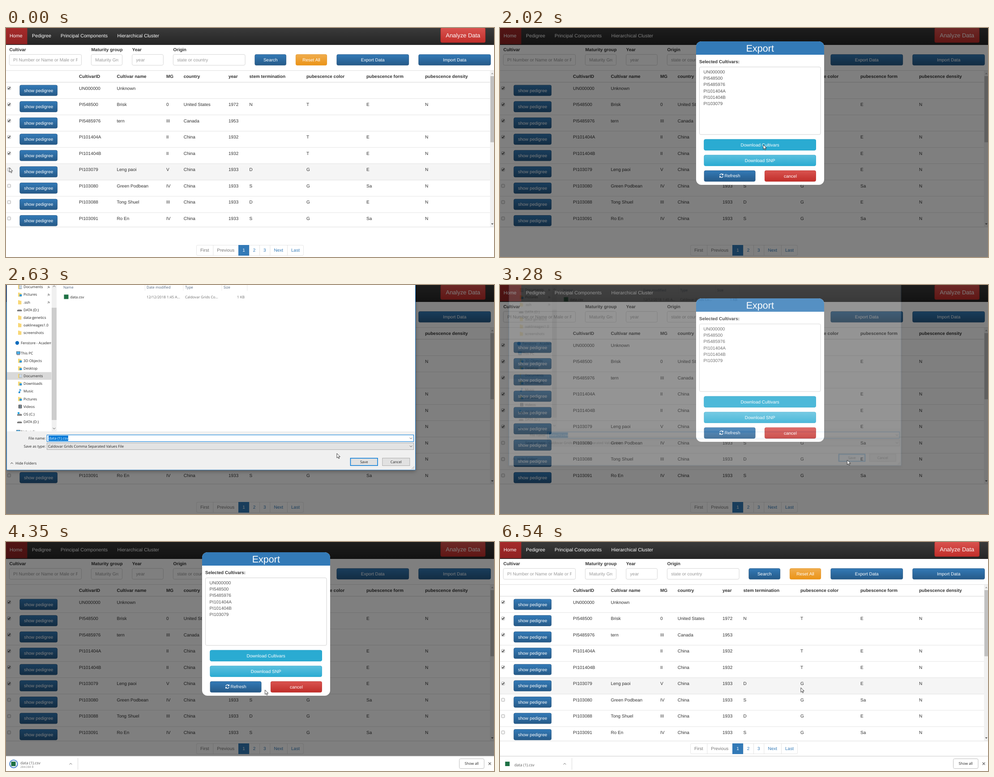
Animation of 1090 by 514 pixels, one loop 6.84 s. Source, as an HTML page:

```html
<!DOCTYPE html>
<html lang="en">
<head>
<meta charset="utf-8">
<title>Export data</title>
<style>
  html, body { margin: 0; width: 100%; height: 100%; overflow: hidden; background: #fff; }
  #stage { display: block; width: 1090px; height: 514px; font-family: "Liberation Sans", Arial, sans-serif; text-rendering: geometricPrecision; }
  text { white-space: pre; }
  .ui { font-family: "Open Sans", "Noto Sans", sans-serif; }
  #dialog { transform-origin: 457.5px 165px; filter: drop-shadow(0 3px 4px rgba(0,0,0,.3)); }
  #ring { transform-origin: 17px 498px; }
</style>
<style id="motion"></style>
</head>
<body>
<svg id="stage" viewBox="0 0 1090 514" xmlns="http://www.w3.org/2000/svg"></svg>
<script>
const LOOP = 6840, ROW = 36.55;
const themes = {
  primary: ['#337ab7', '#265a88', '#245580'],
  warning: ['#f0ad4e', '#eb9316', '#e38d13'],
  danger: ['#d9534f', '#c12e2a', '#b92c28'],
  info: ['#5bc0de', '#2aabd2', '#28a4c9'],
  nav: ['#3a3a3a', '#252525'],
  home: ['#a52a2a', '#8f2323']
};

const rect = (x, y, w, h, fill, more = '') =>
  `<rect x="${x}" y="${y}" width="${w}" height="${h}" fill="${fill}" ${more}/>`;
const box = (x, y, w, h, fill, stroke, r = 0, sw = 1) =>
  rect(x + sw / 2, y + sw / 2, w - sw, h - sw, fill, `rx="${r}" stroke="${stroke}" stroke-width="${sw}"`);
const path = (d, stroke, sw = 1, fill = 'none') =>
  `<path d="${d}" fill="${fill}" stroke="${stroke}" stroke-width="${sw}"/>`;
const text = (x, cy, s, { size = 10, fill = '#333', bold, anchor = 'start' } = {}) =>
  `<text x="${x}" y="${cy + size * .358}" font-size="${size}" fill="${fill}" text-anchor="${anchor}"${bold ? ' font-weight="700"' : ''}>${s}</text>`;
const group = (id, body, cls = '') => `<g id="${id}" class="${cls}">${body}</g>`;
const clip = (x, y, w, h, body) =>
  `<svg x="${x}" y="${y}" width="${w}" height="${h}" viewBox="${x} ${y} ${w} ${h}" overflow="hidden">${body}</svg>`;

function button(x, y, w, h, label, theme, { flat, size = 10.03 } = {}) {
  const [, low, edge] = themes[theme];
  return box(x, y, w, h, flat ? low : `url(#${theme})`, edge, 3, .8) +
    text(x + w / 2, y + h / 2, label, { size, fill: '#fff', anchor: 'middle' });
}

function field(x, w, label, hint) {
  return text(x + .5, 48, label, { bold: true }) + box(x, 59, w, 25, '#fff', '#ccc', 3, .8) +
    clip(x + 9, 60, w - 18, 23, text(x + 9.3, 71.5, hint, { fill: '#999' }));
}

function checkbox(cy, mark) {
  return box(2.8, cy - 4, 8, 8, '#f4f4f4', '#a4a4a4', 1.5, .9) + (mark || '');
}

// Page
const cols = [163, 247.5, 358, 396.7, 497, 543.5, 671, 805, 936];
const heads = 'CultivarID|Cultivar name|MG|country|year|stem termination|pubescence color|pubescence form|pubescence density';
const rows = [
  'UN000000|Unknown',
  'PI548500|Brisk|0|United States|1972|N|T|E|N',
  'PI5485976|tern|III|Canada|1953',
  'PI101404A||II|China|1932||T|E|N',
  'PI101404B||II|China|1932||T|E|N',
  'PI103079|Leng paoi|V|China|1933|D|G|E|N',
  'PI103080|Green Podbean|IV|China|1933|S|G|Sa|N',
  'PI103088|Tong Shuel|III|China|1933|D|G|E|N',
  'PI103091|Ro En|IV|China|1933|S|G|Sa|N'
];
const cells = (line, cy, bold) =>
  line.split('|').map((s, i) => text(cols[i], cy, s, { bold })).join('');

function tableRow(line, i) {
  const cy = 135 + i * ROW;
  const tick = path(`M4.6 ${cy}l1.7 1.9 3-4.2`, '#333', 1.5);
  const mark = i < 5 ? tick : i === 5 ? group('tick', tick) : '';
  return checkbox(cy, mark) + button(30.5, cy - 7.2, 84.5, 24.5, 'show pedigree', 'primary') +
    cells(line, cy) + rect(0, 121.5 + (i + 1) * ROW, 1081, .8, '#ddd');
}

function pager() {
  const edges = [425, 462.5, 519, 543, 566, 589.5, 628, 665];
  return box(425, 487, 240, 24, '#fff', '#ddd', 3, .8) +
    ['First', 'Previous', '1', '2', '3', 'Next', 'Last'].map((s, i) => {
      const x = edges[i], w = edges[i + 1] - x, on = i === 2;
      return (on ? rect(x, 487, w, 24, '#337ab7') : i ? rect(x, 487, .8, 24, '#ddd') : '') +
        text(x + w / 2, 498.7, s, { anchor: 'middle', fill: on ? '#fff' : i < 2 ? '#777' : '#337ab7' });
    }).join('');
}

const navItem = (x, s) => text(x, 17.5, s, { size: 10.74, fill: '#fff' });
const page =
  rect(0, 0, 1090, 514, '#fff') +
  rect(0, 0, 1090, 38, 'url(#nav)') + rect(0, 0, 47.5, 36.5, 'url(#home)') +
  navItem(8, 'Home') + navItem(58, 'Pedigree') + navItem(122, 'Principal Components') + navItem(248.5, 'Hierarchical Cluster') +
  button(970.5, -1, 100.5, 34, 'Analyze Data', 'danger', { size: 12.95 }) +
  field(7, 162, 'Cultivar', 'PI Number or Name or Male or Female') +
  field(190, 70, 'Maturity group', 'Maturity Group') +
  field(281.3, 70.5, 'Year', 'year') + field(373, 161.5, 'Origin', 'state or country') +
  button(555.5, 59, 70.5, 25, 'Search', 'primary') +
  button(647, 59, 70, 25, 'Reset All', 'warning') +
  button(738.5, 59, 161.5, 25, 'Export Data', 'primary') +
  group('exportHot', box(738.5, 59, 161.5, 25, 'inherit', '#1f6ab0', 3, 1.2) +
    text(819.2, 71.5, 'Export Data', { fill: '#fff', anchor: 'middle' })) +
  button(921.3, 59, 161.5, 25, 'Import Data', 'primary') +
  rect(0, 95, 1090, .9, '#ddd') + cells(heads, 108, true) + rect(0, 121, 1081, 1.3, '#ddd') +
  clip(0, 122, 1090, 324.5, group('hover', rect(0, 122, 1081, ROW, '#f5f5f5')) + rows.map(tableRow).join('')) +
  rect(0, 446.2, 1090, 1, '#ddd') +
  rect(1081, 96, 9, 350, '#f1f1f1') + rect(1082, 108, 8, 148.5, '#c1c1c1') +
  path('M1083.5 103.5l2.7-3 2.7 3z', 'none', 0, '#a3a3a3') + path('M1083.5 438.5l2.7 3 2.7-3z', 'none', 0, '#505050') +
  group('pager', pager()) +
  group('shade', rect(0, 0, 1090, 514, '#000'));

// Export panel
const ids = rows.slice(0, 6).map(r => r.split('|')[0]);
const refreshIcon =
  path('M490.8 330.4a3.9 3.9 0 0 1 6.6-1.7M498.2 332.6a3.9 3.9 0 0 1-6.6 1.7', '#fff', 1.5) +
  path('M498.9 326.6v3.8h-3.8zM490.1 336.4v-3.8h3.8z', 'none', 0, '#fff');
const refresh = flat => button(455.7, 319.7, 114.8, 25, '', 'primary', { flat }) + refreshIcon +
  text(501.5, 331.7, 'Refresh', { fill: '#fff' });
const modal =
  rect(438, 30, 286, 322, '#fff', 'rx="12"') +
  path('M438 60V42a12 12 0 0 1 12-12H712a12 12 0 0 1 12 12V60z', 'none', 0, '#337ab7') +
  text(580.8, 45, 'Export', { size: 21.5, fill: '#fff', anchor: 'middle' }) +
  text(445, 75.5, 'Selected Cultivars:', { bold: true }) +
  box(445, 87, 271.5, 152.5, '#fff', '#ccc', 3, .9) +
  ids.map((s, i) => text(454.5, 98.2 + i * 14.3, s, { fill: '#555' })).join('') +
  button(455.5, 249.7, 250.3, 25, 'Download Cultivars', 'info') +
  group('getHot', button(455.5, 249.7, 250.3, 25, 'Download Cultivars', 'info', { flat: true })) +
  button(455.5, 284.8, 250.3, 25, 'Download SNP', 'info') +
  refresh() + group('refreshHot', refresh(true)) +
  button(591, 319.7, 114.8, 25, 'cancel', 'danger') +
  group('cancelHot', button(591, 319.7, 114.8, 25, 'cancel', 'danger', { flat: true }));

// Save dialog
const ui = (x, cy, s, o = {}) => text(x, cy, s, { size: 8.1, fill: '#222', ...o });
const chevron = (x, y, dy = 2.6, c = '#555') => path(`M${x - 2.8} ${y - dy / 2}l2.8 ${dy} 2.8 ${-dy}`, c, 1);

function icon(x, cy, kind) {
  const folder = path(`M${x + 1} ${cy - 4.5}h3l1 1.2h3.4v8H${x + 1}z`, 'none', 0, '#f8d775');
  const accent = c => rect(x + 4.2, cy - .5, 5.2, 4.5, c);
  switch (kind) {
    case 'drive': return path(`M${x - 1} ${cy + .5}l2.5-2h6l2 2z`, 'none', 0, '#bbb') + rect(x - 1, cy + .5, 10.5, 2.6, '#666');
    case 'os': return icon(x, cy, 'drive') + rect(x, cy - 4.5, 4, 4, '#19a0e0');
    case 'doc': return folder + box(x + 3, cy - 3.5, 6.5, 8, '#fff', '#8a98a8', 0, .8) + path(`M${x + 4.5} ${cy - 1}h3.5m-3.5 2h3.5m-3.5 2h3.5`, '#5b86b5', .7);
    case 'music': return path(`M${x + 5} ${cy + 2.5}v-6.5l3 2.2`, '#1f8ad1', 1.4) + `<circle cx="${x + 3.7}" cy="${cy + 2.6}" r="2" fill="#1f8ad1"/>`;
    case 'video': return rect(x + 2, cy - 4, 7, 8, '#444') + rect(x + 3.8, cy - 2.8, 3.4, 2.3, '#9bb8d0') + rect(x + 3.8, cy + .6, 3.4, 2.3, '#9bb8d0');
    case 'pc': return box(x - 3, cy - 4, 9, 6.5, '#4db2ec', '#456', 0, .8) + rect(x - 2, cy + 3.2, 7, 1, '#667');
    case 'cloud': return `<circle cx="${x - 1}" cy="${cy}" r="4.2" fill="#0f6cbd"/>`;
    case 'blue': return folder + accent('#2c95d8');
    default: return folder;
  }
}

const places = [
  ['Documents', 4.5, 'doc', 1], ['Pictures', 21.5, 'blue', 1], ['.ssh', 38.7, '', 1], ['DATA (D:)', 55.8, 'drive'],
  ['data-genetics', 73, ''], ['oaklineages1.0', 90, ''], ['screenshots', 107, ''],
  ['Fenstore - Academic', 130, 'cloud'], ['This PC', 153, 'pc'],
  ['3D Objects', 170, 'blue'], ['Desktop', 187, 'blue'], ['Documents', 204, 'doc'], ['Downloads', 221.3, 'blue'],
  ['Music', 238.5, 'music'], ['Pictures', 255.7, 'blue'], ['Videos', 272.8, 'video'], ['OS (C:)', 290, 'os'],
  ['DATA (D:)', 307, 'drive'], ['Network', 329.5, 'pc']
];
const pin = cy => path(`M92.5 ${cy + 3}l2.4-2.4m-1.6-1.8l3.4 3.4m-2-4.6l3.4 3.4m-2.8-3l-1.4 2m3.6 .2l-2 1.6`, '#777', .9);
const place = ([s, cy, kind, pinned]) =>
  icon(26, cy, kind) + ui(/cloud|pc/.test(kind) ? 33 : 39, cy, s) + (pinned ? pin(cy) : '');
const action = (x, s, hot) =>
  box(x, 388, 62, 18, hot === 'hot' ? '#e5f1fb' : '#e1e1e1', hot ? '#0078d7' : '#adadad', 0, hot ? 1.5 : 1) +
  ui(x + 31, 397, s, { anchor: 'middle' });
const headTint = { fill: '#4c607a' }, dim = { fill: '#6d6d6d' };
const dialog =
  box(1, -60, 914, 475.5, '#fff', '#1979ca') +
  rect(2, 195.5, 99.5, 17.2, '#d9d9d9') +
  clip(2, -40, 99, 368, places.map(place).join('')) +
  rect(102, -40, 11, 368.5, '#f0f0f0') + rect(102, 51, 11, 252, '#cdcdcd') +
  chevron(107.5, 3, -2.6) + chevron(107.5, 322) +
  ui(128, 5, 'Name', headTint) + ui(314, 5, 'Date modified', headTint) + ui(400, 5, 'Type', headTint) + ui(486, 5, 'Size', headTint) +
  [310, 395.5, 481.5, 538.5].map(x => rect(x, -20, .8, 33, '#e5e5e5')).join('') +
  rect(129.5, 21.5, 10, 10, '#1e7145') + ui(143.5, 27, 'data.csv') +
  ui(314, 27, '12/12/2018 1:45 A...', dim) + ui(400, 27, 'Caldovar Grids Co...', dim) + ui(533, 27, '1 KB', { ...dim, anchor: 'end' }) +
  rect(2, 328.5, 912, 86, '#f0f0f0') +
  ui(88.5, 344, 'File name:', { anchor: 'end' }) + ui(88.5, 362, 'Save as type:', { anchor: 'end' }) +
  box(91, 336, 820, 16, '#fff', '#0078d7') + rect(95, 338, 44, 12, '#0078d7') + ui(95.5, 344, 'data (1).csv', { size: 8.3, fill: '#fff' }) +
  box(91, 354, 820, 16, '#e3e3e3', '#adadad') + ui(94, 362, 'Caldovar Grids Comma Separated Values File') +
  chevron(904.5, 344) + chevron(904.5, 362) +
  chevron(13, 400, -2.8, '#222') + ui(21, 399.7, 'Hide Folders') +
  action(768.7, 'Save', 'default') + group('saveHot', action(768.7, 'Save', 'hot')) + action(840.3, 'Cancel') +
  path('M906 413l6-6m-3 6l3-3', '#aaa', 1);

// Download shelf
const shelf =
  rect(0, 480.5, 1090, 34, '#fff') + rect(0, 480.3, 1090, .9, '#c4c4c4') +
  group('ring', '<circle cx="17" cy="498" r="8.8" fill="#e9f0fa" stroke="#cfd8e4" stroke-width="1.4"/>' +
    '<circle id="arc" cx="17" cy="498" r="8.8" fill="none" stroke="#2f6fc4" stroke-width="1.6" stroke-dasharray="55.3" transform="rotate(-90 17 498)"/>') +
  rect(11.5, 493, 10, 10, '#1e7145') +
  group('fileName', ui(32, 495.5, 'data (1).csv', { size: 8.6, fill: '#555' })) +
  group('fileSize', ui(32, 504.7, '284/284 B', { size: 6.3, fill: '#888' })) +
  chevron(144.5, 498, -3, '#666') + rect(160.3, 485, .8, 26, '#d0d0d0') +
  box(1012, 486, 56.5, 23, '#fff', '#bdbdbd', 3) + ui(1040.2, 497.5, 'Show all', { size: 8.2, anchor: 'middle' }) +
  path('M1077.7 494.7l5.6 5.6m0-5.6l-5.6 5.6', '#555', 1.2);

const cursor = path('M0 0V10.2L2.4 8 4 11.7 5.7 11 4.1 7.4H7.3Z', '#111', .8, '#fff');

const defs = Object.entries(themes).map(([id, [a, b]]) =>
  `<linearGradient id="${id}" x2="0" y2="1"><stop stop-color="${a}"/><stop offset="1" stop-color="${b}"/></linearGradient>`).join('');
document.getElementById('stage').innerHTML = `<defs>${defs}</defs>` + page + group('modal', modal) +
  group('shelf', shelf, 'ui') + group('dialog', dialog, 'ui') + group('cursor', cursor);

// Motion: keys are milliseconds within the loop
let css = '';
function animate(id, keys, ease = 'linear') {
  const frames = Object.entries(keys).map(([ms, s]) => `${(ms / LOOP * 100).toFixed(3)}%{${s}}`).join('');
  css += `@keyframes ${id}{${frames}}#${id}{animation:${id} ${LOOP}ms ${ease} infinite}\n`;
}
const move = (x, y) => `transform:translate(${x}px,${y}px)`;
const fade = (o, y = 0) => `opacity:${o};${move(0, y)}`;
const zoom = (o, s) => `opacity:${o};transform:scale(${s})`;
const on = 'opacity:1', off = 'opacity:0';
const hold = (id, from, to) => animate(id, { 0: off, [from]: on, [to]: off, [LOOP]: off }, 'step-end');
const rowAt = i => fade(1, i * ROW);

animate('cursor', {
  0: move(7.5, 313.5), 150: move(7.5, 313.5), 690: move(800, 82), 850: move(793, 68), 1410: move(793, 68),
  1740: move(586, 269), 1820: move(588, 262), 2300: move(588, 262), 2630: move(739, 378), 2710: move(739, 378),
  2860: move(775.5, 393), 3330: move(775.5, 393), 3580: move(640, 470), 3980: move(540, 400), 4240: move(548, 331),
  4350: move(578.5, 332), 4470: move(578.5, 332), 4620: move(672, 327), [LOOP]: move(672, 327)
});
animate('hover', {
  0: rowAt(5), 171: rowAt(4), 257: rowAt(3), 342: rowAt(2), 427: rowAt(1), 513: rowAt(0),
  597: off + ';' + move(0, 0), 6400: rowAt(5), [LOOP]: rowAt(5)
}, 'step-end');
animate('tick', { 0: off, 50: on, [LOOP]: on }, 'step-end');
animate('exportHot', {
  0: off, 740: on + ';fill:#265a88', 1000: on + ';fill:#204d74', 1440: off, [LOOP]: off
}, 'step-end');

animate('shade', { 0: off, 1130: off, 1280: 'opacity:.5', 6390: 'opacity:.5', 6535: off, [LOOP]: off });
animate('modal', {
  0: fade(0, -80), 1150: fade(0, -80), 1290: fade(1, -20), 1390: fade(1), 3630: fade(1), 3760: fade(1, -7),
  6340: fade(1, -7), 6490: fade(0, -60), [LOOP]: fade(0, -80)
});
hold('getHot', 1780, 6500);
hold('refreshHot', 4200, 4350);
hold('cancelHot', 4520, 6500);
hold('saveHot', 2840, 3400);
animate('dialog', {
  0: zoom(0, .94), 2200: zoom(0, .94), 2400: zoom(1, 1), 3190: zoom(1, 1),
  3280: zoom(.17, .96), 3325: zoom(.17, .96), 3335: zoom(0, .95), [LOOP]: zoom(0, .94)
});

animate('shelf', { 0: move(0, 35), 3630: move(0, 35), 3760: move(0, 0), [LOOP]: move(0, 0) });
animate('pager', { 0: move(0, 0), 3630: move(0, 0), 3760: move(0, -35), [LOOP]: move(0, -35) });
animate('arc', {
  0: 'stroke-dashoffset:55.3', 3760: 'stroke-dashoffset:55.3', 4260: 'stroke-dashoffset:0', [LOOP]: 'stroke-dashoffset:0'
});
animate('ring', { 0: on, 4830: on, 4990: off, 5160: off, 5330: on, 5500: off, [LOOP]: off });
animate('fileName', { 0: move(0, 0), 4830: move(0, 4.5), [LOOP]: move(0, 4.5) }, 'step-end');
animate('fileSize', { 0: on, 4830: off, [LOOP]: off }, 'step-end');
document.getElementById('motion').textContent = css;
</script>
</body>
</html>
```
